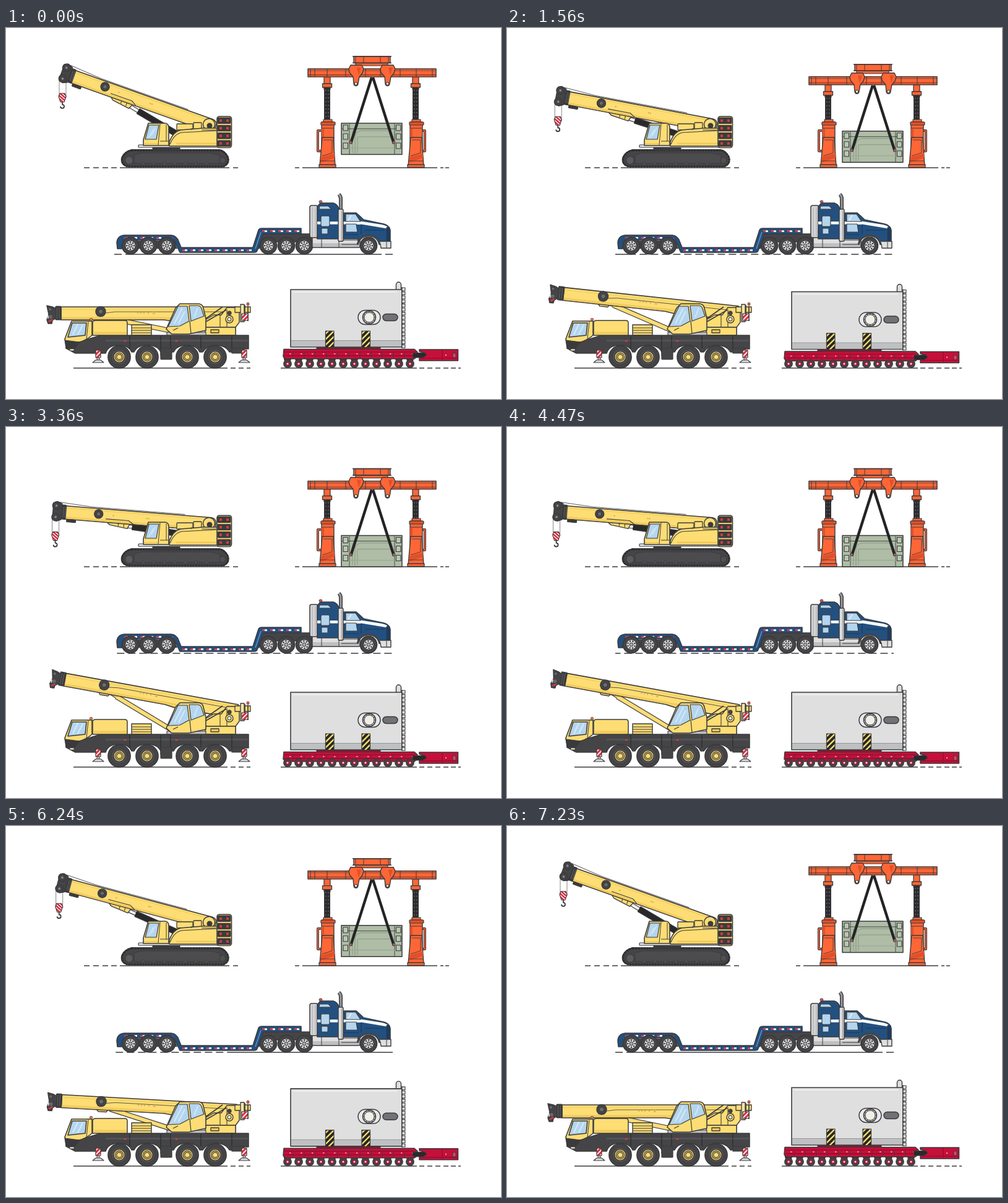
An HTML page with a canvas for the animation above (9 s loop, 800 by 600 pixels).

```html
<!DOCTYPE html>
<html lang="en">
<head>
<meta charset="utf-8">
<title>Heavy haulage</title>
<style>
html, body { margin: 0; width: 100%; height: 100%; overflow: hidden; background: #fff; }
canvas { display: block; width: 800px; height: 600px; }
</style>
</head>
<body>
<canvas id="stage"></canvas>
<script>
const canvas = document.getElementById('stage');
const ctx = canvas.getContext('2d');
const ratio = window.devicePixelRatio || 1;
canvas.width = 800 * ratio;
canvas.height = 600 * ratio;

const LOOP = 9000, STEP = 30, STOP = 7230;
const INK = '#3b3b3d', COAL = '#454547', YELLOW = '#fddd74', SHADE = '#f1cb5c';
const ORANGE = '#ff6636', RUST = '#e2502a', RED = '#c5103a', CRIMSON = '#9f0d30';
const BLUE = '#23507f', GLASS = '#b4d5ee', PALE = '#dfdfe0', GREY = '#bfc0c2', GREEN = '#afbda6';

const ease = x => 0.5 - 0.5 * Math.cos(Math.PI * Math.min(1, Math.max(0, x)));

function paint(path, fill, lw) {
  if (fill) { ctx.fillStyle = fill; ctx.fill(path); }
  if (lw) { ctx.strokeStyle = INK; ctx.lineWidth = lw; ctx.stroke(path); }
}
const shape = (d, fill, lw = 1.5) => paint(new Path2D(d), fill, lw);
function box(x, y, w, h, fill, lw = 1.4, r = 0) {
  const p = new Path2D();
  p.roundRect(x, y, w, h, r);
  paint(p, fill, lw);
}
function disc(x, y, r, fill, lw = 0) {
  const p = new Path2D();
  p.arc(x, y, r, 0, 7);
  paint(p, fill, lw);
}
function line(d, color = INK, lw = 1.2, dash = [], shift = 0) {
  ctx.save();
  ctx.setLineDash(dash);
  ctx.lineDashOffset = shift;
  ctx.strokeStyle = color;
  ctx.lineWidth = lw;
  ctx.stroke(new Path2D(d));
  ctx.restore();
}
function within(fn, dx, dy) {
  ctx.save();
  ctx.translate(dx, dy);
  fn();
  ctx.restore();
}
function turn(x, y, deg, fn) {
  ctx.save();
  ctx.translate(x, y);
  ctx.rotate(deg * Math.PI / 180);
  fn();
  ctx.restore();
}
function spin(x, y, deg) {
  const a = deg * Math.PI / 180, c = Math.cos(a), s = Math.sin(a);
  return [x * c - y * s, x * s + y * c];
}
function ground(y, ...spans) {
  for (const [a, b] of spans) line(`M${a} ${y}H${b}`, INK, 1.5);
}
function stripes(x, y, w, h, back, front, gap, lw) {
  ctx.save();
  ctx.beginPath();
  ctx.rect(x, y, w, h);
  ctx.clip();
  box(x, y, w, h, back, 0);
  for (let k = -w; k < h + w; k += gap) line(`M${x - 2} ${y + k + w + 2}L${x + w + 2} ${y + k - 2}`, front, lw);
  ctx.restore();
  box(x, y, w, h, null, 1.2);
}
// Hydraulic ram: fixed foot, moving end, barrel of constant length.
function ram(fx, fy, ex, ey, barrel, wide, thin, fill) {
  const n = Math.hypot(ex - fx, ey - fy), k = barrel / n;
  const mx = fx + (ex - fx) * k, my = fy + (ey - fy) * k;
  const rod = `M${fx} ${fy}L${ex} ${ey}`, tube = `M${fx} ${fy}L${mx} ${my}`;
  line(rod, INK, thin + 2.4);
  line(rod, fill === YELLOW ? YELLOW : '#fff', thin);
  line(tube, INK, wide + 2.4);
  line(tube, fill, wide);
}

function hook(x, y, top) {
  line(`M${x - 5} ${top}V${y}M${x + 6} ${top}V${y}`, '#77777a', 0.9);
  ctx.save();
  const p = new Path2D(`M${x - 4} ${y - 7}H${x + 4}L${x + 6} ${y - 2}L${x + 3} ${y + 7}H${x - 3}L${x - 6} ${y - 2}Z`);
  ctx.clip(p);
  ctx.fillStyle = '#fff';
  ctx.fill(p);
  for (let k = -14; k < 16; k += 5) line(`M${x - 8} ${y + k - 7}l16 14`, '#d8273c', 2.4);
  ctx.restore();
  paint(p, null, 1.1);
  line(`M${x} ${y + 7}v4a3 3 0 1 1 -3 3`, INK, 1.8);
}

function crawler(p) {
  ground(226, [126, 135], [141, 150], [156, 165], [170, 179], [184, 361], [367, 375]);
  const angle = 19.6 - 15 * p, px = 328, py = 157;
  const [wx, wy] = spin(-248, 8.5, angle);
  hook(px + wx - 0.5, py + wy + 31, py + wy);
  const [ax, ay] = spin(-131, 14, angle);
  ram(277, 172, px + ax, py + ay, 74, 8, 4, '#29292b');
  turn(px, py, angle, () => {
    line('M-243 -16L-190 -12.5H-40', INK, 0.8);
    shape('M-166 9L-160 14L-131 18L-127 9Z', YELLOW, 1.4);
    line('M-146 10V15M-137 10V16', INK, 1.1);
    box(-230, 10, 15, 5, INK, 1, 1);
    shape('M-234 -10.8H3Q11 -10 11 -2V10.5H-234Z', YELLOW, 1.6);
    box(-233, 6.5, 190, 3.3, SHADE, 0);
    line('M-232 -7.5H0', SHADE, 1.2);
    line('M-167 5H-130L-122 10', INK, 1.1);
    for (const x of [-155, -101, -98]) disc(x, -1, 1.2, '#d8b04a');
    disc(-179, -2, 7, COAL, 1.4);
    disc(-179, -2, 3.2, '#69696c', 1);
    box(-241, -12, 9, 23, INK, 1.2, 1);
    for (let x = -239; x < -232; x += 3) line(`M${x} -9V8`, '#727275', 0.7);
    shape('M-253 -14L-247 -17L-239 -14V12L-246 15L-253 11Z', COAL, 1.3);
    for (const y of [-10, 8.5]) {
      disc(-248, y, 6.2, COAL, 1.5);
      disc(-248, y, 2.5, '#85868a', 1);
    }
  });
  // Undercarriage
  shape('M203 197H345Q353 198 358 207Q363 219 352 224H197Q185 222 187 210Q191 200 203 197Z', COAL, 2);
  line('M203 198H345Q353 199 358 208Q362 219 351 224H197Q186 221 188 210Q192 200 203 198Z', '#2e2e30', 3, [3, 1.5]);
  shape('M207 205L220 202H330L346 206V219H207Z', '#4c4c4f', 0.9);
  disc(199, 214, 6.5, '#5a5a5d', 1.2);
  disc(350, 214, 5, '#505053', 1.1);
  for (let x = 222; x < 340; x += 17) disc(x, 219, 2.3, '#535356', 0.8);
  box(237, 192, 44, 6, INK, 1);
  box(214, 189, 130, 4, '#e7e7e8', 1.2, 1);
  // House
  box(276, 155, 26, 10, YELLOW, 1.3, 1);
  box(303, 153, 13, 12, YELLOW, 1.3, 1);
  disc(328, 156, 9.5, YELLOW, 1.5);
  disc(329, 158, 4.5, INK);
  shape('M264 191V184Q270 168 282 165L318 162H342V191Z', YELLOW, 1.5);
  line('M265 188Q272 171 284 169L342 166', INK, 1.1);
  line('M275 187H341', SHADE, 3);
  line('M300 165V162M316 165H340', INK, 1);
  box(341, 143, 23.5, 50.5, YELLOW, 1.6, 4);
  for (let i = 0; i < 4; i++) {
    const y = 145 + i * 12.3;
    box(342, y, 21, 9.5, INK, 1, 1);
    for (const x of [345, 356]) box(x, y + 2.8, 4, 4, '#d23b44', 0);
  }
  shape('M230 154H257Q262 154 263 160V190H222V181Z', YELLOW, 1.6);
  shape('M231 157H247L243 180H225Z', GLASS, 1.2);
  line('M235 174L242 161M231 177L238 164', '#d6eafa', 1.5);
  line('M249 155L246 189M249 183H262M259 156V183', INK, 1);
  line('M223 187H245', SHADE, 2);
}

function jackLeg(x, side, d) {
  box(x - 5, 79 + d, 10, 20, ORANGE, 1.3);
  box(x - 4.5, 96 + d, 9, 54 - d, '#2c2c2e', 1);
  line(`M${x - 2} ${100 + d}V149M${x + 2} ${100 + d}V149`, '#8d8d90', 0.9, [2, 4]);
  box(x - 7.5, 90 + d, 15, 6, ORANGE, 1.3);
  const hx = x + side * 15;
  line(`M${x + side * 10} 166H${hx}V199H${x + side * 10}`, INK, 4);
  line(`M${x + side * 10} 166H${hx}V199H${x + side * 10}`, ORANGE, 1.7);
  box(x - 6, 148, 14, 6, ORANGE, 1.2);
  box(x - 9, 152, 20, 50, ORANGE, 1.4, 1);
  box(x - 10, 152, 23, 5, RUST, 1.2, 1);
  line(`M${x - 8} 162H${x + 10}`, INK, 1);
  box(x - 9, 163, 4, 16, RUST, 0);
  shape(`M${x - 8} 177H${x + 10}L${x + 13} 223H${x - 12}Z`, ORANGE, 1.4);
  shape(`M${x - 10} 209L${x + 12} 203V210L${x - 11} 218Z`, RUST, 0);
  line(`M${x - 6} 181H${x + 8}V202L${x - 8} 207M${x - 11} 215H${x + 12}`, INK, 0.9);
  box(x - 13, 221, 27, 4.5, ORANGE, 1.3);
}

function gantry(p) {
  const d = 21.5 * p;
  ground(226, [467, 474], [479, 697], [702, 707], [710, 716]);
  jackLeg(519, -1, d);
  jackLeg(662, 1, d);
  within(() => {
    box(542, 154, 98, 50.5, GREEN, 1.5);
    line('M543 163H639M555 155V204M628 155V204', INK, 0.9);
    line('M564 204V176Q565 167 574 166H622', '#86957e', 1);
    line('M560 202V166M568 202V176H622', '#86957e', 0.9);
    line('M543 194H639', '#98a690', 1.2);
    for (const x of [545, 630.5]) for (const y of [157, 171, 186]) box(x, y, 7.5, 9, '#bac7b1', 1.1);
    line('M591 80L557 187M593 80L627 187', '#242426', 4.4);
    for (const x of [557, 627]) disc(x, 185, 2.2, '#b2635d', 0.8);
    box(488, 66, 207, 13, ORANGE, 1.5);
    box(489, 76, 205, 2.6, RUST, 0);
    line('M488 69H695M488 75.5H695', INK, 0.7);
    for (const x of [492, 499, 519, 549, 581, 605, 637, 663, 689]) line(`M${x} 66V79`, INK, 1);
    box(565, 56, 52, 5, ORANGE, 1.2);
    box(562, 46, 59, 10.5, ORANGE, 1.4);
    line('M560 46H623M560 56.5H623', INK, 1.5);
    line('M565 46V56M578 46V56M605 46V56M618 46V56', INK, 1);
    for (const x of [566, 617]) {
      shape(`M${x - 9} 60H${x + 9}L${x + 12} 66L${x + 10} 73L${x + 5} 79L${x + 3} 90A3.5 3.5 0 0 1 ${x - 4} 90L${x - 5} 79L${x - 11} 72L${x - 12} 66Z`, ORANGE, 1.4);
      shape(`M${x + 1} 64H${x + 8}L${x + 4} 77Z`, RUST, 0);
      disc(x - 0.5, 90, 2.2, '#fff', 1.1);
    }
  }, 0, d);
}

function roadWheel(x, roll) {
  disc(x, 352, 13.5, COAL, 1.8);
  disc(x, 352, 8.2, PALE, 1);
  turn(x, 352, roll, () => {
    for (let i = 0; i < 8; i++) {
      const a = i * Math.PI / 4;
      disc(5.8 * Math.cos(a), 5.8 * Math.sin(a), 1.3, INK);
    }
  });
  disc(x, 352, 3, '#a5a6a9', 1);
}

function truck(m) {
  const run = ease(m / STOP), cycle = 3600, roll = run * 360 * 41;
  const dashes = [414, 6];
  for (let n = 420; n < cycle; n += 18) dashes.push(12, 6);
  const span = dashes.reduce((a, b) => a + b);
  ctx.save();
  ctx.beginPath();
  ctx.rect(175, 360, 450, 12);
  ctx.clip();
  // The long dash starts at x = 193 when the truck stands still.
  line('M175 366H625', INK, 1.6, dashes, (run + 1) * span - 18);
  ctx.restore();
  // Trailer
  shape('M413 333H497V346H411L409 357L405 350Z', COAL, 1.3);
  shape('M180 357L179 347Q180 336 191 335H267Q276 336 279 345L283 355H399L408 327Q409 324 413 324H477V333H416L406 360Q405 363 401 363H281L274 348Q272 343 268 343H193Q188 344 187 357Z', BLUE, 1.6);
  shape('M190 344H272L277 357H187Z', COAL, 0);
  for (const d of ['M191 339.3H270', 'M285 359.3H401', 'M414 328.7H475']) {
    line(d, '#f4f4f4', 2.7, [8, 5]);
    line(d, '#de3346', 2.7, [4, 9]);
  }
  line('M403 357L412 330', '#6ea0cf', 1.2);
  [201, 230, 260, 424, 453, 482].forEach(x => roadWheel(x, roll));
  // Tractor
  line('M541 350V276Q541 272 538 269', INK, 6);
  line('M541 350V276Q541 272 538 269', '#98999c', 3);
  box(495, 338, 77, 17, PALE, 1.4, 2);
  box(496, 348, 75, 6, GREY, 0);
  line('M538 339V355M542 343H570M542 350H570M510 339V355', INK, 1);
  box(491, 287, 13, 52, '#d5d5d7', 1.5, 3);
  line('M495 290V337M500 290V337', '#a5a6a8', 1);
  shape('M503 341V289L508 283H529Q536 285 538 293V341Z', BLUE, 1.6);
  shape('M507 288H521L526 293H506Z', GLASS, 1.1);
  shape('M546 299H566Q572 304 578 310L611 317Q619 319 621 327V350H603Q601 336 586 336Q572 336 569 350V341H546Z', BLUE, 1.6);
  box(503, 313, 70, 4.5, '#fff', 0);
  shape('M570 312L608 318Q617 320 620 325L575 317.5H566Z', '#fff', 0);
  box(509, 304, 14, 17, GLASS, 1.2, 2);
  box(510, 324, 10, 9, GLASS, 1, 1);
  shape('M549 301H565L573 313H549Z', GLASS, 1.2);
  line('M553 311L558 303', '#eaf5fc', 1.5);
  shape('M549 317H566L568 330H549Z', GLASS, 1.2);
  line('M546 334H570M574 318V334M580 327H612', '#123a67', 1.1);
  box(537, 293, 8, 52, PALE, 1.4, 2);
  line('M542.5 295V344', '#9fa0a3', 1.5);
  box(615, 322, 5, 25, '#153d6c', 1, 1);
  shape('M603 345H622V356H606Q606 350 603 345Z', PALE, 1.4);
  line('M615 346V356', INK, 1);
  line('M568 350Q572 336 586 336Q600 336 604 350', COAL, 3);
  roadWheel(586, roll);
  box(506, 279, 5, 4, '#e74d44', 0.8, 2);
}

function bigWheel(x) {
  disc(x, 532, 18, COAL, 1.8);
  disc(x, 532, 13, '#4d4d50', 0.9);
  disc(x, 532, 9, YELLOW, 1.2);
  disc(x, 532, 6.6, SHADE, 1.2);
  disc(x, 532, 4.2, YELLOW, 1.2);
}

function outrigger(x) {
  box(x - 2, 530, 4, 9, GREY, 1);
  shape(`M${x - 9} 541L${x - 4} 537H${x + 4}L${x + 9} 541Z`, PALE, 1.1);
  stripes(x - 4, 521, 8, 12, '#fff', '#e0313f', 7, 3.2);
}

function mobile(p) {
  const angle = 10.3 * p, px = 385, py = 470;
  ground(550, [109, 358], [363, 371], [376, 384], [389, 395]);
  const [ex, ey] = spin(161 - px, 468 - py, angle);
  ram(268, 490, px + ex, py + ey, 105, 6, 3.5, YELLOW);
  turn(px, py, angle, () => within(() => {
    shape('M145 464V470L149 475H162L168 466Z', YELLOW, 1.4);
    shape('M89 451H372V474H270L255 472H89Z', YELLOW, 1.6);
    box(90, 467.5, 190, 3.6, SHADE, 0);
    line('M90 455H370', SHADE, 1.2);
    line('M147 466L160 461L176 459H368', INK, 0.8);
    for (const x of [213, 218, 223, 230]) disc(x, 461, 1, '#c9a34b');
    disc(239, 461, 2.2, '#e2b955');
    disc(153, 458.5, 8, COAL, 1.5);
    disc(153, 458.5, 3.6, '#6c6c6f', 1);
    box(80, 450, 9, 22, INK, 1.2, 1);
    for (const x of [82.5, 86]) line(`M${x} 452V470`, '#717174', 0.8);
    shape('M66 449L75 451L81 454V469L75 473L74 478H68L66 472L69 463Z', COAL, 1.4);
    disc(71, 455, 2.8, '#66676a', 1);
    disc(72, 467, 3.6, '#66676a', 1);
    line('M69 475L75 471', '#df3443', 2.5);
    line('M68 470V465', '#fff', 1.4);
  }, -px, -py));
  // Rear superstructure
  shape('M322 497V472L336 464H348L357 452H377V476L371 484V497Z', YELLOW, 1.4);
  line('M323 470L350 451M323 475L356 456', INK, 1.6);
  line('M324 484H371M346 464V484M357 455V484', INK, 1.1);
  disc(361, 471, 6, YELLOW, 1.4);
  disc(361, 471, 2.8, '#fff', 1.1);
  disc(361, 461, 3.2, COAL, 1);
  box(370, 451, 25, 9, YELLOW, 1.3);
  box(379, 447, 6, 28, '#f5e3a7', 1.3);
  line('M386 448V474M391 450V474', INK, 1.7);
  stripes(381, 462, 10, 11, '#fff', '#d83442', 7, 3.2);
  box(389, 444, 4, 5, '#f0583c', 0.7, 2);
  box(322, 484, 49, 13, YELLOW, 1.4);
  box(331, 488, 13, 5, SHADE, 1.3);
  box(203, 480, 32, 17, YELLOW, 1.4);
  line('M203 485H235M203 489H235M203 493H235', INK, 1.1);
  box(260, 492, 63, 6, GREY, 1.1);
  shape('M281 446H312Q318 447 319 453L323 470V489L295 495H268L259 487L274 453Z', YELLOW, 1.6);
  shape('M278 450H293L296 474L281 482L262 483Z', GLASS, 1.2);
  shape('M296 449H311Q315 450 316 454L320 466L299 474Z', GLASS, 1.2);
  line('M272 478L285 453M279 478L289 458M304 468L310 453', '#d6eafa', 1.8);
  line('M297 474L299 494M270 489L278 485', INK, 1.2);
  // Carrier
  shape('M97 505L130 504L153 497H392V519H365V524H361Q355 513 338 513Q326 513 318 524H313Q308 513 293 513Q276 513 271 524H250Q245 513 228 513Q212 513 207 524H203Q198 513 183 513Q165 513 161 526H112L97 518Z', COAL, 1.5);
  box(161, 504, 230, 3, '#535356', 0);
  line('M200 498V518M250 498V530M266 498V530M315 498V518M365 498V519', '#2c2c2e', 1.2);
  box(250, 518, 18, 18, COAL, 1.2, 1);
  box(365, 518, 20, 8, COAL, 1.2);
  shape('M140 497V477Q140 473 145 473H192Q196 473 196 477V497Z', YELLOW, 1.5);
  line('M142 493.5H195', SHADE, 4);
  shape('M106 474H139V497Q130 505 118 508L97 511L95 503Z', YELLOW, 1.6);
  shape('M107 477H130L128 497L100 500Z', GLASS, 1.6);
  line('M108 496L116 479M116 496L124 480', '#d6eafa', 2);
  line('M133 475L130 503', INK, 1);
  shape('M95 505L119 508L111 518H97Z', '#3a3a3c', 1.1);
  box(103, 519, 7, 3, '#f4ead0', 0.8);
  box(135.5, 469.5, 4, 4, '#f0763c', 0.7, 1);
  for (const x of [190, 273]) box(x, 505, 5, 2.5, '#dd4846', 0.5);
  [183, 228, 293, 338].forEach(bigWheel);
  outrigger(149);
  outrigger(385);
}

function transporter(p) {
  ground(550, [444, 664], [668, 676], [681, 689], [694, 702], [707, 715], [719, 727], [731, 735]);
  const e = 6 * p;
  within(() => {
    box(630.5, 411, 8, 16, PALE, 1.4, 4);
    box(460, 423, 180, 93, PALE, 1.6);
    box(461, 506, 178, 9, GREY, 0);
    line('M461 505.5H639', '#8d8e91', 0.9);
    line('M464 427H632', '#eeeeef', 2);
    line('M640 419V518', INK, 1.3);
    for (let y = 420; y < 516; y += 6.6) box(640, y, 5, 4.8, '#e7e7e8', 1.1);
    box(569, 456.5, 36, 23, '#e8e8e9', 1.5, 11.5);
    disc(587, 468, 10.5, GREY, 1.4);
    disc(587, 468, 8, '#f0eee5', 1);
    for (let i = 0; i < 12; i++) {
      const a = i * Math.PI / 6;
      disc(587 + 9.2 * Math.cos(a), 468 + 9.2 * Math.sin(a), 0.8, INK);
    }
    box(609, 462.5, 24, 11, '#717276', 1.5, 5.5);
    for (const x of [516.5, 575]) stripes(x, 490, 13.5, 27, '#ffe06b', '#262628', 9, 4);
    box(502, 516.5, 103, 3, CRIMSON, 1);
  }, 0, e);
  for (let i = 0; i < 12; i++) {
    const x = 455 + i * 18;
    shape(`M${x - 7} ${530 + e}H${x + 7}L${x + 3} 544H${x - 3}Z`, '#6d1b30', 1);
  }
  within(() => {
    shape('M449 519.5H660L665 524V531L660 535H452L448 531Z', RED, 1.5);
    line('M449 524H662', CRIMSON, 1.6);
    line('M450 530H660', CRIMSON, 2);
    for (let x = 464; x < 655; x += 18) line(`M${x} 524V535`, INK, 0.9);
    for (let x = 458; x < 660; x += 18) box(x, 526, 2.5, 2, '#ef8193', 0);
    line('M658 529H682', INK, 5);
    shape('M668 538V531L678 526L668 523V520H730.5V538H668Z', RED, 1.5);
    line('M669 534H730M705 521V538', CRIMSON, 1.6);
    shape('M657 526L676 525L680 529L674 533H658Z', '#29292b', 1);
    box(722, 526, 5, 7, '#d54a63', 1);
    box(710, 528, 2, 2, '#f3a3ae', 0);
  }, 0, e);
  for (let i = 0; i < 12; i++) {
    const x = 455 + i * 18;
    disc(x, 543, 6.3, COAL, 1.2);
    disc(x, 543, 3.5, RED, 0.8);
    disc(x, 543, 1.6, '#f2dfe2');
  }
}

function draw(now) {
  const t = Math.floor((now % LOOP) / STEP) * STEP, m = Math.min(t, STOP);
  const p = m < 4500 ? ease(m / 2790) : m === STOP ? 0 : 1 - ease((m - 4500) / 2790);
  ctx.setTransform(ratio, 0, 0, ratio, 0, 0);
  ctx.fillStyle = '#fff';
  ctx.fillRect(0, 0, 800, 600);
  ctx.lineJoin = 'round';
  crawler(p);
  gantry(p);
  truck(m);
  mobile(p);
  transporter(p);
}

const start = performance.now();
function frame() {
  draw(performance.now() - start);
  requestAnimationFrame(frame);
}
frame();
</script>
</body>
</html>
```
